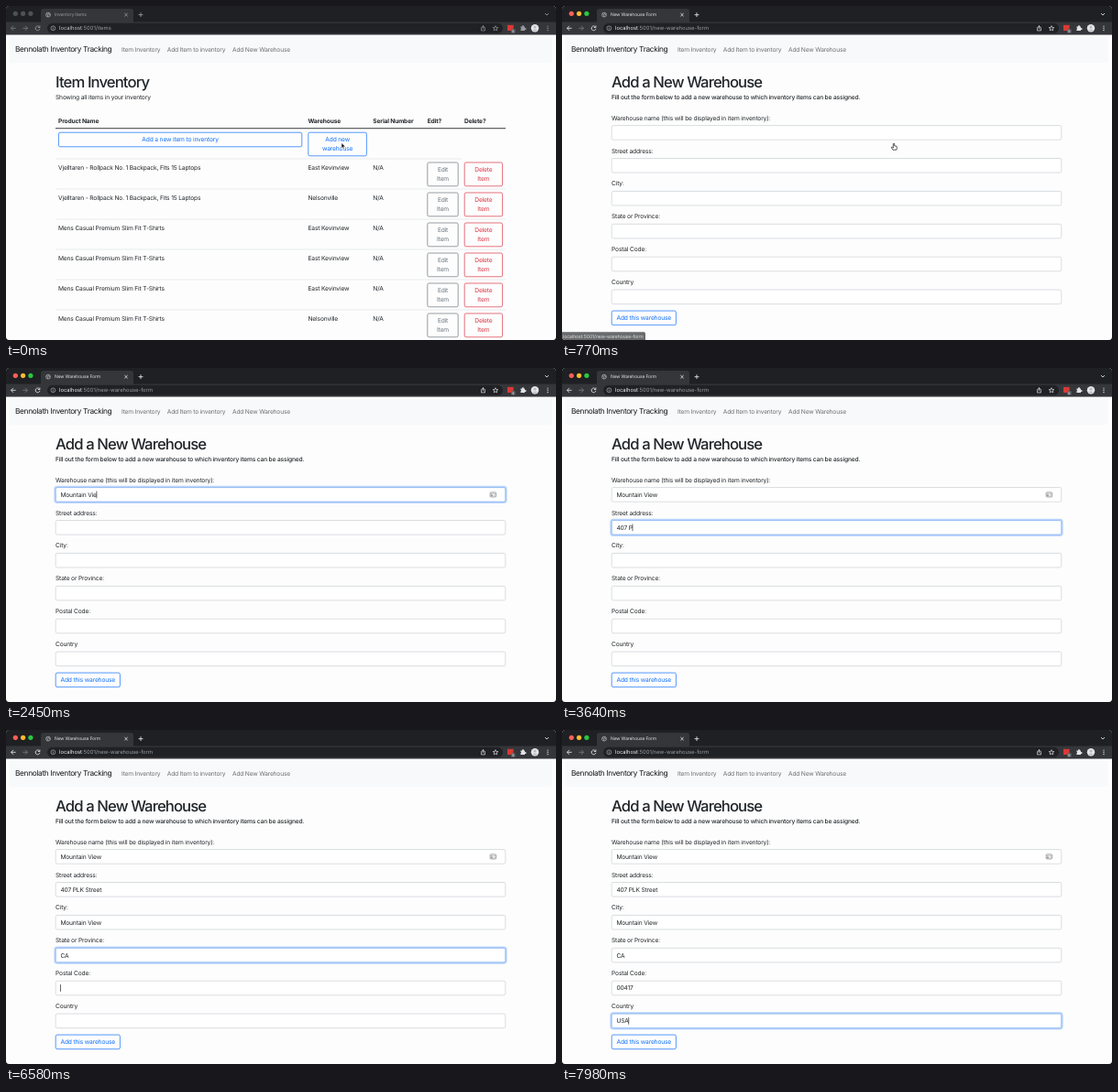
Recreate the animation shown at these times as an HTML page with a canvas. Size 600 by 365 pixels, loop 8 s.

```html
<!DOCTYPE html>
<html lang="en">
<head>
<meta charset="utf-8">
<title>Inventory</title>
<style>
html, body { margin: 0; width: 100%; height: 100%; overflow: hidden; background: #000; }
canvas { display: block; }
</style>
</head>
<body>
<canvas id="stage" width="600" height="365"></canvas>
<script>
const ctx = document.getElementById('stage').getContext('2d');
const STEP = 70, LOOP = 8000;
const BLUE = '#0d6efd', GREY = '#6c757d', RED = '#dc3545', TEXT = '#212529';

// Times below are counted in steps of 70 ms.
const WINDOW_FOCUS = 3, STATUS_ON = 4, NAVIGATE = 9, STATUS_OFF = 12, MOVE = 14, TYPING = 24;
const fields = [
  { label: 'Warehouse name (this will be displayed in item inventory):', value: 'Mountain View', focus: 20,
    keys: [24, 25, 26, 27, 28, 29, 30, 31, 32, 33, 34, 35, 37] },
  { label: 'Street address:', value: '407 PLK Street', focus: 40,
    keys: [46, 47, 49, 51, 52, 54, 56, 57, 59, 60, 61, 63, 65, 68] },
  { label: 'City:', value: 'Mountain View', focus: 72,
    keys: [74, 75, 76, 77, 78, 79, 80, 81, 82, 83, 84, 85, 86] },
  { label: 'State or Province:', value: 'CA', focus: 88, keys: [91, 92] },
  { label: 'Postal Code:', value: '00417', focus: 94, keys: [100, 101, 102, 104, 105] },
  { label: 'Country', value: 'USA', focus: 107, keys: [112, 113, 114] },
];

const backpack = 'Vjelltaren - Rollpack No. 1 Backpack, Fits 15 Laptops';
const shirt = 'Mens Casual Premium Slim Fit T-Shirts';
const east = 'East Kevinview', nelson = 'Nelsonville';
const items = [[backpack, east], [backpack, nelson], [shirt, east], [shirt, east], [shirt, east], [shirt, nelson]];

const clamp = v => Math.max(0, Math.min(1, v));
const ease = v => { v = clamp(v); return v * v * (3 - 2 * v); };
const fade = (step, start) => ease((step - start) * STEP / 150);

// y is the middle of the line; the return value is the text width.
function text(s, x, y, { size = 6.67, color = TEXT, weight = 400, spacing = -.024, align = 'left' } = {}) {
  ctx.font = `${weight} ${size}px Inter, "Open Sans", sans-serif`;
  ctx.letterSpacing = spacing * size + 'px';
  ctx.textRendering = 'geometricPrecision';
  ctx.textAlign = align;
  ctx.fillStyle = color;
  ctx.fillText(s, x, y + size * .36);
  return ctx.measureText(s).width;
}

function rect(x, y, w, h, color) {
  ctx.fillStyle = color;
  ctx.fillRect(x, y, w, h);
}

function box(x, y, w, h, r, { fill, stroke, width = .7 }) {
  ctx.beginPath();
  ctx.roundRect(x, y, w, h, r);
  if (fill) { ctx.fillStyle = fill; ctx.fill(); }
  if (stroke) { ctx.strokeStyle = stroke; ctx.lineWidth = width; ctx.stroke(); }
}

function disc(x, y, r, color) {
  ctx.beginPath();
  ctx.arc(x, y, r, 0, 7);
  ctx.fillStyle = color;
  ctx.fill();
}

function icon(d, x, y, { fill, stroke, width = .9 }) {
  const path = new Path2D(d);
  ctx.save();
  ctx.translate(x, y);
  ctx.lineJoin = 'round';
  if (fill) { ctx.fillStyle = fill; ctx.fill(path); }
  if (stroke) { ctx.strokeStyle = stroke; ctx.lineWidth = width; ctx.stroke(path); }
  ctx.restore();
}

function button(lines, x, y, w, h, color, hover = 0) {
  box(x, y, w, h, 1.7, { stroke: color });
  if (hover) {
    ctx.globalAlpha = hover;
    box(x, y, w, h, 1.7, { fill: color });
    ctx.globalAlpha = 1;
  }
  lines.forEach((line, i) =>
    text(line, x + w / 2, y + h / 2 + (i - (lines.length - 1) / 2) * 10,
      { color: hover > .5 ? '#fff' : color, align: 'center' }));
}

function browser(step) {
  const active = step >= WINDOW_FOCUS, form = step >= NAVIGATE;
  const ink = active ? '#dfe1e5' : '#96999d', dim = '#8d9094';
  const line = { stroke: ink };
  rect(0, 0, 600, 18, '#1f2023');
  rect(0, 17.5, 600, 14, '#35363a');
  box(38, 3, 101, 16, [3.3, 3.3, 0, 0], { fill: '#35363a' });
  ['#ff5f57', '#febc2e', '#28c840'].forEach((c, i) => disc(10.3 + i * 8.3, 8.3, 2.6, active ? c : '#505154'));

  icon('M-2.4 0a2.4 2.4 0 1 0 4.8 0a2.4 2.4 0 1 0-4.8 0M-2 -1L0 0L-.6 2M.2 -2L1 -.4L2.2 .3', 46, 9.6, { stroke: '#b9bcc0', width: .7 });
  text(form ? 'New Warehouse Form' : 'Inventory Items', 53, 9.6, { size: 5, color: ink });
  icon('M-1.6-1.6L1.6 1.6M1.6-1.6L-1.6 1.6', 131, 9.6, line);
  icon('M-2.4 0H2.4M0-2.4V2.4', 147, 9.6, line);
  icon('M-2-1L0 1L2-1', 590, 9, line);

  const arrow = 'M2.6 0H-2.4M0-2.5L-2.5 0L0 2.5';
  icon(arrow, 8, 24.3, { stroke: form ? ink : '#77797d' });
  icon('M-2.6 0H2.4M0-2.5L2.5 0L0 2.5', 21, 24.3, { stroke: '#77797d' });
  icon('M1.8-1.6A2.4 2.4 0 1 0 2.4 .6M2.4-2.8V-.8H.4', 34.5, 24.3, line);

  box(45, 18.8, 497, 11, 5.5, { fill: '#202124' });
  icon('M-2.4 0a2.4 2.4 0 1 0 4.8 0a2.4 2.4 0 1 0-4.8 0M0-.3V1.4M0-1.4V-.8', 51.4, 24.3, { stroke: '#aeb1b5', width: .7 });
  const url = { size: 5.83, spacing: 0, color: active ? '#f1f3f4' : '#c8cacd' };
  const host = text('localhost', 58, 24.2, url);
  text(form ? ':5001/new-warehouse-form' : ':5001/items', 58 + host, 24.2, { ...url, color: '#9aa0a6' });

  icon('M-1-.8H-2V2.6H2V-.8H1M0 1V-2.8M-1.3-1.5L0-2.8L1.3-1.5', 520.5, 24.3, { stroke: ink, width: .7 });
  icon('M0-2.8L.8-.9L2.8-.8L1.2 .5L1.7 2.4L0 1.4L-1.7 2.4L-1.2 .5L-2.8-.8L-.8-.9Z', 534, 24.4, { stroke: ink, width: .7 });
  rect(547, 20.8, 6.6, 6.2, '#d93a36');
  box(551, 25.2, 4.6, 4.2, 1, { fill: '#5f6368' });
  text('5', 553.3, 27.3, { size: 3.6, color: '#fff', align: 'center' });
  icon('M-2.6-1.6H-.9A1 1 0 1 1 .9-1.6H2V0A1 1 0 1 1 2 1.6V2.8H-2.6V1.4A1 1 0 0 0-2.6-.4Z', 564, 24.2, { fill: ink });
  disc(577, 24.3, 4.2, '#e3e5e8');
  disc(577, 23, 1.5, '#b6b9be');
  icon('M-2.7 2.8A2.9 2.2 0 0 1 2.7 2.8Z', 577, 24.4, { fill: '#b6b9be' });
  for (const dy of [-2.2, 0, 2.2]) disc(591, 24.3 + dy, .7, active ? ink : dim);
}

function navbar() {
  rect(3.5, 32.8, 592, 29.4, '#f8f9fa');
  text('Bennolath Inventory Tracking', 10, 47.5, { size: 8.33, spacing: -.042, color: '#191a1a' });
  [['Item Inventory', 126], ['Add Item to inventory', 175.8], ['Add New Warehouse', 247]]
    .forEach(([s, x]) => text(s, x, 47.5, { color: '#707070', spacing: -.029 }));
}

function heading(title, subtitle, weight) {
  text(title, 54, 83, { size: 16.67, weight: 500, spacing: -.053 });
  text(subtitle, 54, 99.8, { weight });
}

function listPage(step) {
  heading('Item Inventory', 'Showing all items in your inventory', 400);
  [['Product Name', 57], ['Warehouse', 329.5], ['Serial Number', 400.3], ['Edit?', 459.7], ['Delete?', 500]]
    .forEach(([s, x]) => text(s, x, 125.7, { weight: 700 }));
  rect(54, 133.3, 491, .9, '#212529');
  button(['Add a new item to inventory'], 57.4, 138.2, 265.4, 15.6, BLUE);
  button(['Add new', 'warehouse'], 329.8, 138.2, 63.6, 25.6, BLUE, fade(step, WINDOW_FOCUS));
  items.forEach(([name, place], i) => {
    const y = 167 + i * 33;
    rect(54, y - .3, i ? 491 : 443, .6, '#d9dde1');
    text(name, 57, y + 9.4);
    text(place, 329.5, y + 9.4);
    text('N/A', 400.3, y + 9.4);
    button(['Edit', 'Item'], 459.8, y + 4, 33.4, 25.8, GREY);
    button(['Delete', 'Item'], 500.2, y + 4, 41.4, 25.8, RED);
  });
}

function formPage(step) {
  heading('Add a New Warehouse', 'Fill out the form below to add a new warehouse to which inventory items can be assigned.', 500);
  fields.forEach(({ label, value, focus, keys }, i) => {
    const y = 138.4 + i * 35.9, next = i < 5 ? fields[i + 1].focus : Infinity;
    const glow = fade(step, focus) - fade(step, next);
    text(label, 54, y - 16.2);
    box(54.2, y - 7.8, 490.6, 15.6, 1.7, { fill: '#fff', stroke: '#cbd0d5' });
    if (glow) {
      ctx.globalAlpha = glow;
      box(53.2, y - 8.8, 492.6, 17.6, 2.6, { stroke: 'rgba(13,110,253,.27)', width: 1.7 });
      box(54.2, y - 7.8, 490.6, 15.6, 1.7, { stroke: '#86b7fe' });
      ctx.globalAlpha = 1;
    }
    const typed = keys.filter(k => k <= step);
    const width = text(value.slice(0, typed.length), 59.4, y);
    const lastInput = typed.length ? typed[typed.length - 1] : focus;
    const caretOn = Math.floor((step - lastInput) / 4) % 2 === 0;
    if (step >= focus && step < next && caretOn) rect(59.2 + width, y - 3.9, .6, 7.8, '#000');
  });
  if (step >= fields[0].focus) {
    box(528.2, 135.9, 6.4, 5, .8, { stroke: '#777' });
    disc(530, 137.7, .7, '#777');
    rect(529, 138.8, 2, 1, '#777');
    rect(531.8, 137.2, 1.8, .6, '#777');
    rect(531.8, 138.8, 1.8, .6, '#777');
  }
  button(['Add this warehouse'], 54.2, 333.1, 70.2, 15.6, BLUE);
}

function pointer(step) {
  if (step >= TYPING) return;
  const approach = ease((step - 1) / 6), move = ease((step - MOVE) / 5);
  const x = 366 - 4 * approach - 6 * move, y = 149.6 + .6 * approach - 11.5 * move;
  if (step < WINDOW_FOCUS) {
    icon('M0 0V5.8L1.4 4.6L2.3 6.7L3.3 6.2L2.4 4.2H4.2Z', x, y, { fill: '#000', stroke: '#fff', width: .6 });
  } else if (y > 146) {
    icon('M-.7 .3Q0-.5 .7 .3V2.6L3 3.1Q3.6 3.4 3.4 4.4L2.8 7H-1L-2.6 4.6Q-2.6 3.6-1.6 4L-.7 4.8Z', x, y, { fill: '#fff', stroke: '#111', width: .7 });
  } else {
    icon('M-1.4-3.4Q0-3.4 0-2.6Q0-3.4 1.4-3.4M0-2.6V2.6M-1.4 3.4Q0 3.4 0 2.6Q0 3.4 1.4 3.4', x, y, { stroke: '#222', width: .7 });
  }
}

function draw(time) {
  const step = Math.floor(time % LOOP / STEP);
  rect(0, 0, 600, 365, '#000');
  ctx.save();
  ctx.beginPath();
  ctx.roundRect(0, 0, 600, 365, 3.5);
  ctx.clip();
  rect(0, 0, 600, 365, '#fdfdfd');
  browser(step);
  navbar();
  (step < NAVIGATE ? listPage : formPage)(step);
  if (step >= STATUS_ON && step < STATUS_OFF) {
    box(0, 356.2, 91, 9, [0, 1.7, 0, 0], { fill: '#6a6b6d' });
    text('localhost:5001/new-warehouse-form', 1, 360.7, { size: 5, spacing: 0, color: '#e4e5e7' });
  }
  pointer(step);
  ctx.restore();
}

const start = performance.now();
(function tick() {
  draw(performance.now() - start);
  requestAnimationFrame(tick);
})();
</script>
</body>
</html>
```
